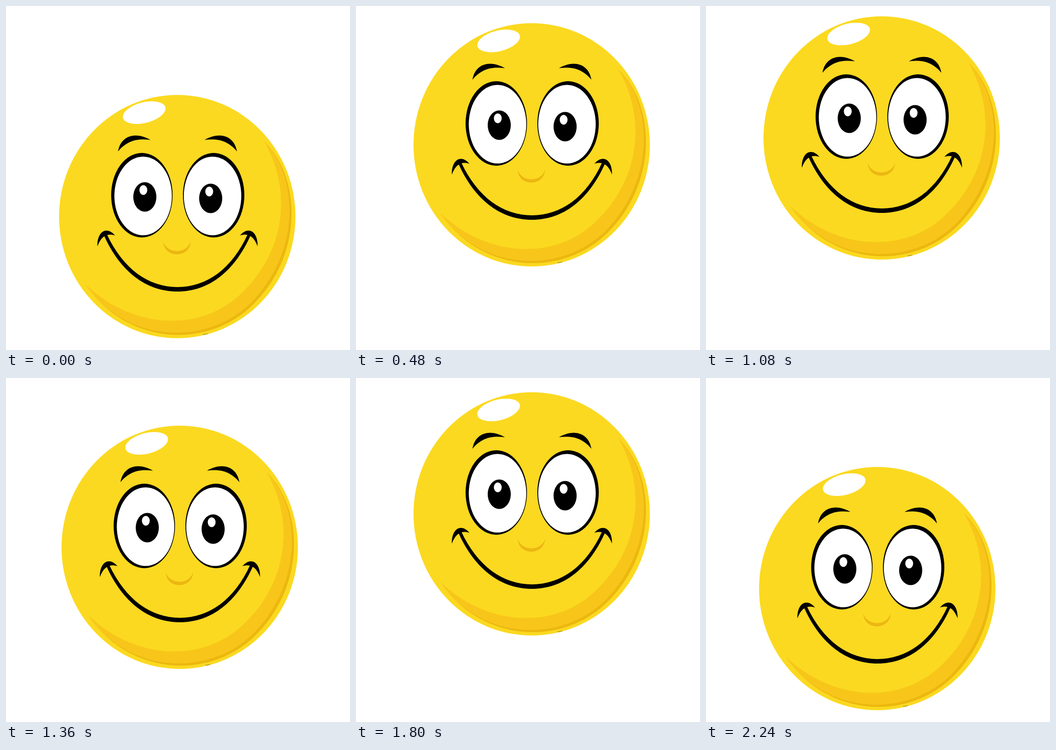
Write an HTML page that moves like this. It is 700 by 700 pixels and loops after 2280 ms.

```html
<!DOCTYPE html>
<html lang="en">
<head>
<meta charset="utf-8">
<title>Bouncing smiley</title>
<style>
  html, body { margin: 0; width: 100%; height: 100%; overflow: hidden; background: #fff; }
  svg { display: block; width: 100%; height: 100%; }
</style>
</head>
<body>
<svg viewBox="0 0 700 700">
  <defs>
    <clipPath id="rim"><ellipse cx="348.5" cy="428.5" rx="240.5" ry="247.5"/></clipPath>
    <g id="creases">
      <path d="M228 296C233 265 262 254 294 272.5C267 269 246 274 228 296Z"/>
      <path d="M186 489C185 460 204 446 222 467C207 462 194 467 186 489Z"/>
    </g>
  </defs>
  <g id="ball">
    <ellipse cx="348.5" cy="428.5" rx="240.5" ry="247.5" fill="#fbd920"/>

    <!-- shade along the lower right -->
    <g clip-path="url(#rim)">
      <path fill="#ecb70f" d="M526 276C600 350 604 500 510 600C420 699 250 695 163 568C260 660 400 665 482 582C557 510 590 390 526 276Z"/>
      <path fill="#f8c61b" d="M526 276C595 348 599 494 506 596C420 691 250 693 163 568C260 660 400 665 482 582C557 510 590 390 526 276Z"/>
      <path d="M401 668.5L411 667" stroke="#a99a1c" stroke-width="1.5"/>
    </g>
    <ellipse cx="281.3" cy="217" rx="44.5" ry="21" fill="#fff" transform="rotate(-14 281.3 217)"/>

    <!-- brows and cheeks -->
    <use href="#creases"/>
    <use href="#creases" transform="translate(698 0) scale(-1 1)"/>

    <!-- eyes -->
    <ellipse cx="276.5" cy="385" rx="62.5" ry="86"/>
    <ellipse cx="279" cy="386.5" rx="58.5" ry="80" fill="#fff"/>
    <ellipse cx="422.5" cy="385" rx="62.5" ry="86"/>
    <ellipse cx="420.3" cy="386.5" rx="58.5" ry="80" fill="#fff"/>
    <g id="pupil">
      <ellipse cx="282.5" cy="388.5" rx="23.5" ry="30"/>
      <ellipse cx="279.5" cy="374.5" rx="8" ry="10" fill="#fff"/>
    </g>
    <use href="#pupil" x="134" y="3"/>

    <!-- nose and mouth -->
    <path fill="#ecb712" d="M320 480C322 514 374 514 376 479C368 505 329 505 320 480Z"/>
    <path d="M199 466C232 540 285 581 349 581C413 581 465 540 498 466L492 464C460 535 408 572 349 572C290 572 238 535 205 464Z"/>
  </g>
</svg>
<script>
  const FRAME = 40, STEPS = 19, TOP = 168.4;

  // Decelerating rise, short crest, then a quarter-wave fall.
  function lift(i) {
    if (i <= 8) return Math.round((100 * i - 5 * i * i) / 3);
    return Math.round(TOP * Math.cos((i - 9) / 9 * Math.PI / 2));
  }

  const place = i => {
    const y = lift(i);
    return `translate(${Math.round(y * 0.0583)}px, ${-y}px)`;
  };

  const poses = Array.from({ length: STEPS + 1 }, (_, i) => ({
    offset: i / STEPS,
    transform: place(i % STEPS),
    easing: "step-end"
  }));

  document.getElementById("ball").animate(poses, {
    duration: FRAME * STEPS,
    iterations: Infinity
  });
</script>
</body>
</html>
```
